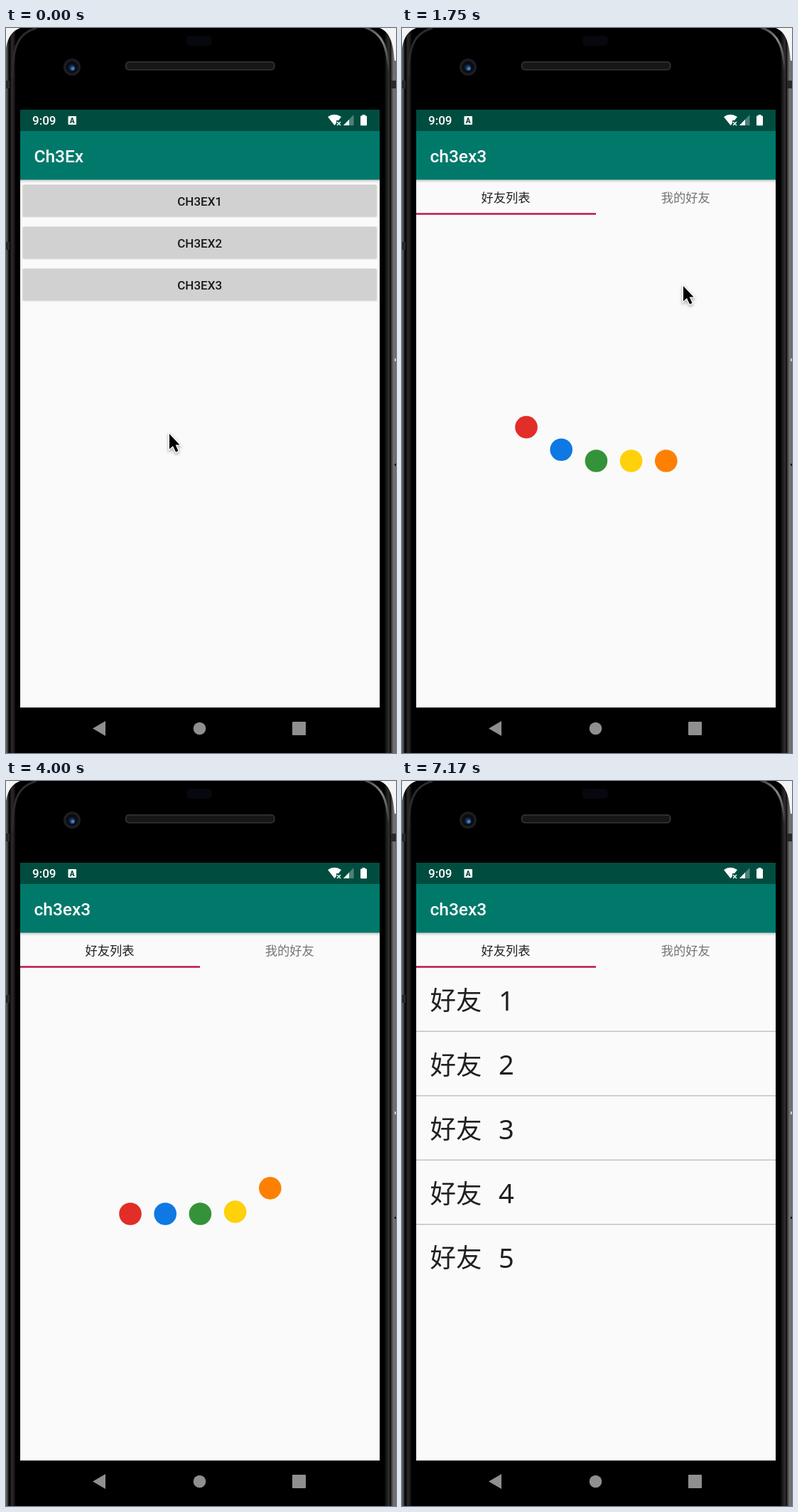
These frames come from a looping animation (549 by 1020 pixels, 7330 ms). An HTML page with a canvas:

```html
<!DOCTYPE html>
<html lang="zh">
<head>
<meta charset="utf-8">
<style>
  html, body { margin: 0; width: 100%; height: 100%; overflow: hidden; background: #000; }
  canvas { display: block; width: 549px; height: 1020px; }
</style>
</head>
<body>
<canvas id="stage" width="549" height="1020"></canvas>
<script>
const ctx = document.getElementById('stage').getContext('2d');
const LOOP = 7330, STEP = 250 / 3;
const LATIN = 'Roboto, sans-serif';
const CJK = '"Noto Sans CJK SC", "Noto Sans CJK", sans-serif';
const DOTS = ['#e22d28', '#0f78e3', '#349339', '#fed10a', '#fd8002'];

// Key times are in steps of 1/12 s.
const WAVE = [[13, -7], [16, -.89], [29, 21.62], [40, 43.37], [54, 73.67], [59, 73.67], [72, 99.65], [88, 131.65]];
const CURSOR_X = [[0, 230], [3, 242], [7, 345], [10, 396], [36, 396], [38, 352], [40, 289], [45, 190], [47, 170]];
const CURSOR_Y = [[0, 569], [3, 552], [7, 425], [10, 361], [36, 361], [38, 318], [40, 256], [45, 41], [47, -35]];
const ENTER = [[14, 35], [15, 25], [16, 10], [17, 4], [18, 2], [19, 1], [20, 0]];
const EXIT = [[14, 0], [15, -7], [16, -13], [18, -17]];
const REVEAL = [[14, 930], [15, 500], [16, 176], [17, 128], [18, 115]];

function track(keys, n) {
  if (n <= keys[0][0]) return keys[0][1];
  for (let i = 1; i < keys.length; i++) {
    const [a, from] = keys[i - 1], [b, to] = keys[i];
    if (n <= b) return from + (to - from) * (n - a) / (b - a);
  }
  return keys[keys.length - 1][1];
}

function rect(x, y, w, h, color, r = 0) {
  ctx.fillStyle = color;
  ctx.beginPath();
  ctx.roundRect(x, y, w, h, r);
  ctx.fill();
}

function disc(x, y, r, color) {
  ctx.fillStyle = color;
  ctx.beginPath();
  ctx.arc(x, y, r, 0, 7);
  ctx.fill();
}

function poly(color, ...points) {
  ctx.fillStyle = color;
  ctx.beginPath();
  points.forEach(p => ctx.lineTo(...p));
  ctx.closePath();
  ctx.fill();
}

function text(str, x, y, font, color, align = 'left') {
  ctx.font = font;
  ctx.fillStyle = color;
  ctx.textAlign = align;
  ctx.fillText(str, x, y);
}

function gradient(x0, y0, x1, y1, ...stops) {
  const g = ctx.createLinearGradient(x0, y0, x1, y1);
  stops.forEach(([at, color]) => g.addColorStop(at, color));
  return g;
}

function phone() {
  rect(0, 0, 549, 1020, '#000');
  rect(0, 0, 20, 1020, gradient(0, 0, 20, 0, [0, '#666'], [.13, '#3a3a3a'], [.2, '#050505'],
    [.28, '#080808'], [.4, '#2b2b2b'], [.6, '#171717'], [.68, '#000']));
  rect(526, 0, 23, 1020, gradient(526, 0, 549, 0, [0, '#000'], [.28, '#000'], [.4, '#181818'],
    [.58, '#303030'], [.66, '#080808'], [.72, '#3a3a3a'], [.86, '#777'], [1, '#666']));
  // rounded top of the frame
  ctx.fillStyle = '#f4f4f4';
  ctx.fill(new Path2D('M0 0H20C9 4 3 12 0 28ZM549 0H526C539 5 545 18 547 46H549Z'));
  ctx.fillStyle = '#000';
  ctx.fill(new Path2D('M14 62C14 25 24 5 52 0H494C523 5 533 25 533 62Z'));
  ctx.lineWidth = 3;
  ctx.strokeStyle = '#2c2c2c';
  ctx.stroke(new Path2D('M9 70C9 26 17 7 43 0'));
  ctx.strokeStyle = gradient(505, 0, 540, 60, [0, '#444'], [.35, '#888'], [1, '#2b2b2b']);
  ctx.stroke(new Path2D('M505 -1C530 7 538 26 539 70'));
  for (const [x, y, w, h] of [[0, 74, 5, 11], [542, 74, 7, 11], [0, 301, 5, 11]]) rect(x, y, w, h, '#292929');
  rect(547, 465, 2, 4, '#ccc');
  rect(547, 613, 2, 3, '#111');

  rect(254, 11, 36, 14, '#07070e', 5);
  disc(93, 55, 12, '#1d1d20');
  disc(93, 55, 8.5, '#080d17');
  disc(93, 56, 4.5, '#172f50');
  disc(94, 57, 2.5, '#437db9');
  rect(168, 47, 210.5, 12.5, '#363636', 5);
  rect(169.5, 48.5, 207.5, 9.5, '#171717', 4);
}

function statusIcons() {
  text('9:09', 37, 136, `500 17px ${LATIN}`, '#fff');
  rect(87.5, 124, 11.5, 12, '#fff', 1);
  text('A', 93.2, 133.7, `900 10px ${LATIN}`, '#004d40', 'center');
  ctx.fillStyle = '#fff';
  ctx.fill(new Path2D('M453 125Q462 118.5 472 125L468 130H465V134L462.5 137Z'));
  ctx.lineWidth = 1.4;
  ctx.strokeStyle = '#fff';
  ctx.stroke(new Path2D('M466 132L471 137M471 132L466 137'));
  poly('#ffffff4d', [475, 137], [489.5, 122], [489.5, 137]);
  poly('#fff', [475, 137], [483, 128.7], [483, 137]);
  rect(499, 123.5, 9, 13.7, '#fff', 1);
  rect(501.5, 122, 4, 3, '#fff');
}

function navIcons() {
  poly('#8f8f8f', [122, 985.5], [140, 975], [140, 996]);
  disc(272.5, 985.5, 8.8, '#8f8f8f');
  rect(403, 976, 19, 19, '#8f8f8f', 1);
}

function page(title) {
  rect(20, 115, 506, 841, '#fafafa');
  rect(20, 213, 506, 5, gradient(0, 213, 0, 218, [0, '#0003'], [1, '#0000']));
  rect(20, 115, 506, 30, '#004d40');
  rect(20, 145, 506, 68.5, '#00796b');
  text(title, 39.5, 188.7, `500 24.5px ${LATIN}`, '#fff');
}

function menuPage(pressed) {
  page('Ch3Ex');
  for (let i = 0; i < 3; i++) {
    const y = 220.5 + 59 * i;
    rect(23, y, 499.5, 46, '#0000001f', 2);
    rect(24, y, 497.5, 44.5, pressed && i === 2 ? '#bfc0c0' : '#d0d1d0', 2);
    text('CH3EX' + (i + 1), 272.7, y + 29, `500 17px ${LATIN}`, '#1a1a1a', 'center');
  }
}

function loader(n) {
  const phase = track(WAVE, n) + 2;
  const center = phase - Math.floor(phase / 8) * 8 - 2;
  DOTS.forEach((color, i) => {
    const distance = Math.min(2, Math.abs(center - i));
    const lift = 49 * Math.cos(distance * Math.PI / 4) ** 2;
    disc(175 + 49.2 * i, 609 - lift, 15.8, color);
  });
}

function friendList() {
  for (let i = 0; i < 5; i++) {
    const y = 322 + 90.5 * i;
    text('好友', 39.5, y, `36.5px ${CJK}`, '#202020');
    text(i + 1, 136, y + .5, '38px "Noto Sans", sans-serif', '#202020');
    if (i < 4) rect(20, y + 29.5, 506, 1.5, '#c3c3c3');
  }
}

function friendsPage(n) {
  page('ch3ex3');
  text('好友列表', 146, 244.5, `17.3px ${CJK}`, '#212121', 'center');
  text('我的好友', 399.3, 244.5, `17.3px ${CJK}`, '#757575', 'center');
  rect(20, 260.2, 253, 2.6, '#bd1552');
  const shown = (1 - Math.cos(Math.PI * Math.min(1, Math.max(0, (n - 72) / 4)))) / 2;
  ctx.globalAlpha = 1 - shown;
  if (shown < 1) loader(n);
  ctx.globalAlpha = shown;
  friendList();
  ctx.globalAlpha = 1;
}

function shifted(dy, draw) {
  ctx.save();
  ctx.translate(0, dy);
  draw();
  ctx.restore();
}

function screen(n) {
  if (n < 18) {
    ctx.save();
    ctx.beginPath();
    ctx.rect(20, 115, 506, 841);
    ctx.clip();
    shifted(track(EXIT, n), () => menuPage(n >= 12));
    if (n >= 14) rect(20, 115, 506, 841, '#0000001c');
    ctx.restore();
  }
  if (n >= 14) {
    const top = track(REVEAL, n);
    ctx.save();
    ctx.beginPath();
    ctx.rect(20, top, 506, 1020 - top);
    ctx.clip();
    shifted(track(ENTER, n), () => friendsPage(n));
    ctx.restore();
    // keep the status bar filled while the page slides
    if (n >= 18) rect(20, 115, 506, 30, '#004d40');
  }
}

function cursor(n) {
  if (n > 47) return;
  ctx.save();
  ctx.translate(track(CURSOR_X, n), track(CURSOR_Y, n));
  const arrow = new Path2D('M0 2V23.5L5 19L9 27.5L12.5 26L8.7 17.6H14.5Z');
  ctx.shadowColor = '#0006';
  ctx.shadowBlur = 4;
  ctx.shadowOffsetY = 2;
  ctx.lineWidth = 2.4;
  ctx.strokeStyle = '#fff';
  ctx.stroke(arrow);
  ctx.shadowColor = 'transparent';
  ctx.fillStyle = '#000';
  ctx.fill(arrow);
  ctx.restore();
}

function render(now) {
  const n = Math.floor((now % LOOP + 3.4) / STEP);
  phone();
  screen(n);
  statusIcons();
  navIcons();
  cursor(n);
  requestAnimationFrame(render);
}
render(0);
</script>
</body>
</html>
```
